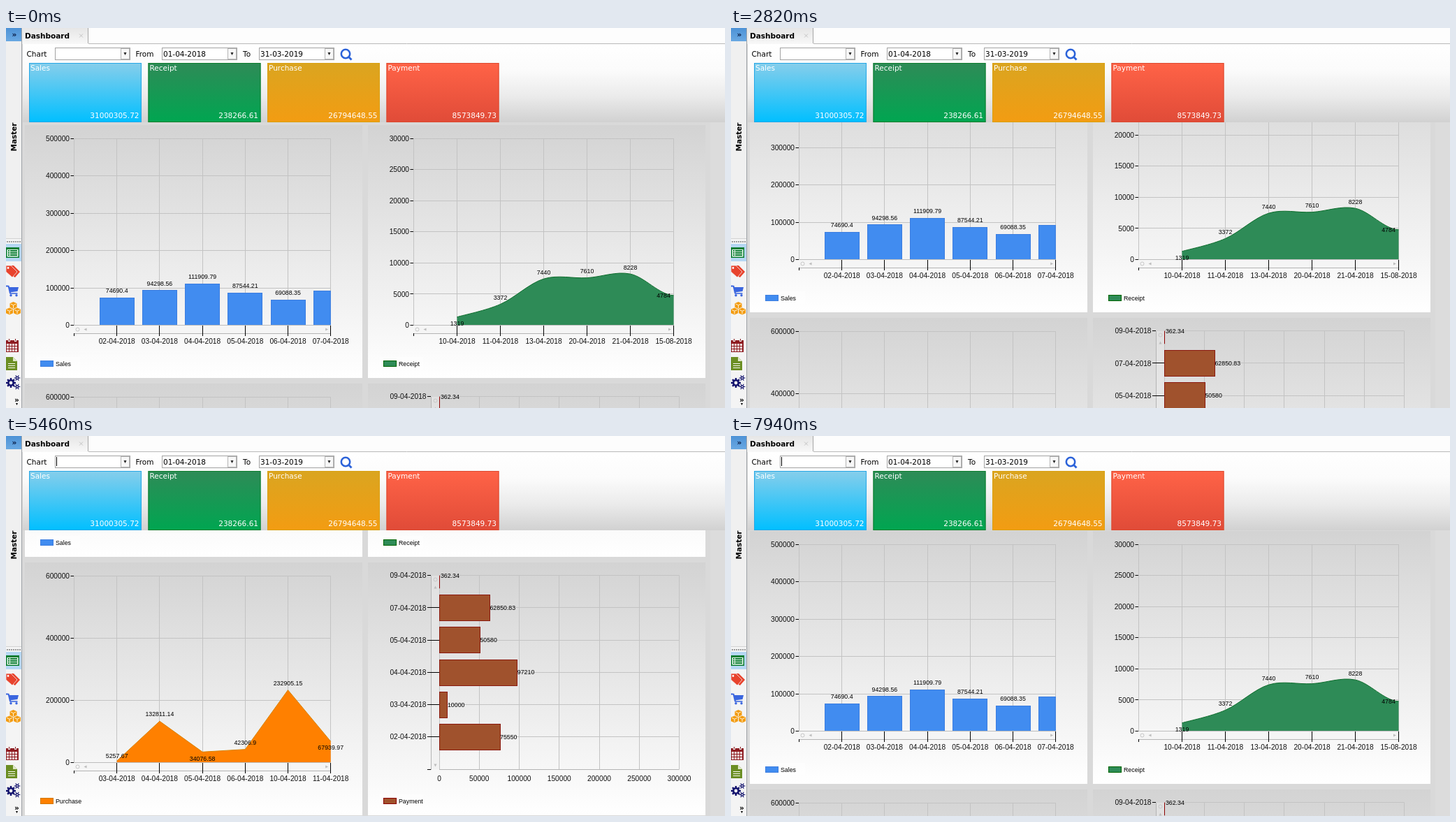
An HTML page with a canvas for the animation above (8 s loop, 1029 px wide and 544 px high).

```html
<!DOCTYPE html>
<html lang="en">
<head>
<meta charset="utf-8">
<title>Dashboard</title>
<style>
html, body { margin: 0; width: 100%; height: 100%; overflow: hidden; background: #ddd; }
canvas { display: block; width: 1029px; height: 544px; }
</style>
</head>
<body>
<canvas id="stage" width="1029" height="544"></canvas>
<script>
const ctx = document.getElementById('stage').getContext('2d');
const LOOP = 8000;
const UI = '"DejaVu Sans", Verdana, sans-serif';
const PLOT = '"Liberation Sans", Arial, sans-serif';
const GRID = '#c3c3c3';

// ---------- timing ----------
// Bursts of repaints: start, end, number of repaints
const bursts = [
  [1280, 1820, 8], [1970, 2740, 11], [2820, 3600, 11], [3670, 4450, 11], [4530, 4990, 7],
  [5460, 5460, 1], [5700, 6500, 11], [6550, 7320, 11], [7410, 7940, 8]
];
// Scroll path: time, offset, speed
const path = [
  [0, 0, 0], [1200, 0, 0.03], [2050, 32, 0.06], [3520, 170, 0.115], [4450, 283, 0.115],
  [4990, 328, 0.04], [5000, 328, 0], [5623, 328, -0.12], [6500, 204, -0.15], [7940, 3, -0.11]
];

function lastRepaint(t) {
  let tick = 0;
  for (const [start, end, count] of bursts) {
    if (t < start) break;
    const gap = count > 1 ? (end - start) / (count - 1) : 1;
    tick = start + Math.min(count - 1, Math.floor((t - start) / gap + 1e-6)) * gap;
  }
  return tick;
}

function scrollAt(t) {
  if (t >= 4990 && t < 5623) return 328;
  let i = 0;
  while (i < path.length - 2 && t >= path[i + 1][0]) i++;
  const [t0, y0, v0] = path[i], [t1, y1, v1] = path[i + 1];
  const d = t1 - t0, u = Math.min(1, (t - t0) / d), w = 1 - u;
  return Math.round(w * w * (1 + 2 * u) * y0 + u * u * (3 - 2 * u) * y1 +
    d * u * w * (w * v0 - u * v1));
}

const caretOn = t => t >= 1280 && Math.floor((t - 5460) / 530) % 2 === 0;

// ---------- drawing helpers ----------
function box(x, y, w, h, fill, stroke) {
  if (fill) { ctx.fillStyle = fill; ctx.fillRect(x, y, w, h); }
  if (stroke) {
    ctx.strokeStyle = stroke; ctx.lineWidth = 1;
    ctx.strokeRect(x + 0.5, y + 0.5, w - 1, h - 1);
  }
}

function vGrad(y0, y1, ...colors) {
  const g = ctx.createLinearGradient(0, y0, 0, y1);
  colors.forEach((c, i) => g.addColorStop(i / (colors.length - 1), c));
  return g;
}

function line(x0, y0, x1, y1, color = '#000', width = 1) {
  ctx.strokeStyle = color; ctx.lineWidth = width;
  ctx.beginPath(); ctx.moveTo(x0, y0); ctx.lineTo(x1, y1); ctx.stroke();
}

const snap = v => Math.floor(v) + 0.5;
const hLine = (x0, x1, y, color) => line(x0, snap(y), x1, snap(y), color);
const vLine = (x, y0, y1, color) => line(snap(x), y0, snap(x), y1, color);

function poly(points, fill, stroke, width = 1) {
  ctx.beginPath();
  points.forEach(([x, y], i) => i ? ctx.lineTo(x, y) : ctx.moveTo(x, y));
  ctx.closePath();
  if (fill) { ctx.fillStyle = fill; ctx.fill(); }
  if (stroke) { ctx.strokeStyle = stroke; ctx.lineWidth = width; ctx.stroke(); }
}

function disc(x, y, r, fill, stroke, width = 1) {
  ctx.beginPath(); ctx.arc(x, y, r, 0, 7);
  if (fill) { ctx.fillStyle = fill; ctx.fill(); }
  if (stroke) { ctx.strokeStyle = stroke; ctx.lineWidth = width; ctx.stroke(); }
}

// y is the middle of the capitals
function text(s, x, y, size, family, align = 'left', color = '#000', weight = '') {
  ctx.font = `${weight} ${size}px ${family}`;
  ctx.textAlign = align; ctx.fillStyle = color;
  ctx.fillText(s, x, Math.round(y + size * 0.36));
}
const label = (s, x, y, align = 'left', color = '#000', weight = '') =>
  text(s, x, y, 10.5, UI, align, color, weight);
const axisText = (s, x, y, align) => text(s, x, y, 10.2, PLOT, align, '#111');
const valueText = (s, x, y, align = 'center') => text(s, x, y, 8.8, PLOT, align);

function arrow(x, y, dx, dy, color, r = 2) {
  poly([[x + dx * r, y + dy * r], [x - dx * r + dy * r, y - dy * r + dx * r],
    [x - dx * r - dy * r, y - dy * r - dx * r]], color);
}

// ---------- charts ----------
function panel(x, name, color, edge) {
  box(x, 139, 483, 362, vGrad(139, 501, '#d3d3d3', '#ffffff'));
  box(x + 17, 471, 62, 18, 'rgba(255,255,255,.6)');
  box(x + 22, 476, 19, 9, color, edge);
  valueText(name, x + 44, 480.5, 'left');
}

// Grid with a value axis on the left and dates along the bottom
function frame(left, step, max, tick, dates) {
  const right = left + step * 6;
  for (let v = 0; v <= max; v += tick) {
    const y = 425.5 - 267.5 * v / max;
    hLine(left, right, y, GRID);
    hLine(left - 5, left, y);
    axisText(String(v), left - 6.5, y, 'right');
  }
  vLine(left, 158, 426, GRID);
  dates.forEach((d, i) => vLine(left + step * (i + 1), 158, 426, GRID));
  return right;
}

function dateAxis(left, step, dates) {
  const right = left + step * 6;
  box(left, 426, right - left, 11, 'rgba(246,246,246,.9)');
  hLine(left, right, 425, '#bdbdbd');
  hLine(left, right, 437, '#b4b4b4');
  disc(left + 5, 431.5, 2.5, null, '#c6c6c6');
  arrow(left + 16, 431.5, -1, 0, '#bcbcbc');
  arrow(right - 5.5, 431.5, 1, 0, '#bcbcbc');
  vLine(left, 437, 441);
  dates.forEach((d, i) => {
    const x = left + step * (i + 1);
    vLine(x, 426, 441);
    axisText(d + '-2018', x, 448, 'center');
  });
}

function salesChart() {
  const left = 97.5, step = 61.2;
  const dates = ['02-04', '03-04', '04-04', '05-04', '06-04', '07-04'];
  const sales = [74690.4, 94298.56, 111909.79, 87544.21, 69088.35, 92500];
  panel(27, 'Sales', '#418cf0', '#3f7fe0');
  const right = frame(left, step, 500000, 100000, dates);
  sales.forEach((v, i) => {
    const x = Math.round(left + step * (i + 1) - 25), y = Math.round(425.5 - v * 267.5 / 500000);
    box(x, y, Math.min(50, right - x), 426 - y, '#418cf0', '#3b7de0');
  });
  dateAxis(left, step, dates);
  sales.slice(0, 5).forEach((v, i) =>
    valueText(String(v), left + step * (i + 1), 416 - v * 267.5 / 500000));
}

function receiptChart() {
  const left = 583.5, step = 62;
  const dates = ['10-04', '11-04', '13-04', '20-04', '21-04', '15-08'];
  const values = [1319, 3372, 7440, 7610, 8228, 4784];
  panel(518, 'Receipt', '#2e8b57', '#006400');
  frame(left, step, 30000, 5000, dates);
  const pts = [...values, 7700].map((v, i) => [left + step * (i + 1), 425.5 - v * 267.5 / 30000]);
  const curve = () => {
    for (let i = 0; i < 5; i++) {
      const a = pts[Math.max(0, i - 1)], b = pts[i], c = pts[i + 1], d = pts[i + 2];
      ctx.bezierCurveTo(b[0] + (c[0] - a[0]) / 6, b[1] + (c[1] - a[1]) / 6,
        c[0] - (d[0] - b[0]) / 6, c[1] - (d[1] - b[1]) / 6, c[0], c[1]);
    }
  };
  ctx.beginPath(); ctx.moveTo(pts[0][0], 426); ctx.lineTo(...pts[0]);
  curve();
  ctx.lineTo(pts[5][0], 426); ctx.fillStyle = '#2e8b57'; ctx.fill();
  ctx.beginPath(); ctx.moveTo(...pts[0]); curve();
  ctx.strokeStyle = '#0b6b2a'; ctx.lineWidth = 1; ctx.stroke();
  dateAxis(left, step, dates);
  const shift = [[0, 9.5], [0, -9.5], [0, -9.5], [0, -9.5], [0, -9.5], [-14.5, 0]];
  values.forEach((v, i) => valueText(String(v), pts[i][0] + shift[i][0], pts[i][1] + shift[i][1]));
}

function purchaseChart() {
  const left = 97.5, step = 61.2;
  const dates = ['03-04', '04-04', '05-04', '06-04', '10-04', '11-04'];
  const values = [5257.67, 132811.14, 34076.58, 42306.9, 232905.15, 67939.97];
  panel(27, 'Purchase', '#ff8000', '#d07800');
  const right = frame(left, step, 600000, 200000, dates);
  const pts = values.map((v, i) => [left + step * (i + 1), 425.5 - v * 267.5 / 600000]);
  poly([[pts[0][0], 426], ...pts, [right, 426]], '#ff8000');
  pts.slice(1).forEach((p, i) => line(...pts[i], ...p, '#d88200'));
  dateAxis(left, step, dates);
  const shift = [-7, -10, 9.5, -9.5, -9.5, 9];
  values.forEach((v, i) => valueText(String(v), pts[i][0], pts[i][1] + shift[i]));
}

function paymentChart() {
  const left = 620, stepX = 57.25, stepY = 46.2, top = 157.7, bottom = 435;
  const rows = [['09-04', 362.34], ['07-04', 62850.83], ['05-04', 50580],
    ['04-04', 97210], ['03-04', 10000], ['02-04', 75550]];
  panel(518, 'Payment', '#a0522d', '#8b0000');
  for (let i = 0; i <= 6; i++) {
    const x = left + stepX * i;
    vLine(x, top, bottom, GRID);
    axisText(String(i * 50000), x, 448, 'center');
  }
  rows.forEach((r, i) => hLine(left, left + stepX * 6, top + stepY * i, GRID));
  box(609, 158, 11, 277, 'rgba(238,238,238,.45)');
  vLine(608, 158, 436, '#b4b4b4');
  disc(614.5, 163.5, 2.5, null, '#c8c8c8');
  arrow(614.5, 174.5, 0, -1, '#bcbcbc');
  arrow(614.5, 429.5, 0, 1, '#bcbcbc');
  hLine(left, left + stepX * 6, bottom, '#b4b4b4');
  hLine(603, 608, bottom);
  rows.forEach(([day, v], i) => {
    const y = top + stepY * i, w = v * stepX / 50000;
    hLine(603, i ? left : 608, y);
    axisText(day + '-2018', 601.5, y, 'right');
    if (i) box(left, Math.round(y - 18.7), Math.round(w) + 1, 38, '#a0522d', '#8b1a10');
    else vLine(left, y, y + 18.5, '#8b0000');
    valueText(String(v), left + w + (i ? 0.5 : 1.5), y, 'left');
  });
}

function charts(scroll) {
  ctx.save();
  ctx.beginPath(); ctx.rect(24, 135, 1005, 409); ctx.clip();
  box(24, 135, 1005, 409, '#dcdcdc');
  box(24, 135, 984, 409, '#d9d9d9');
  ctx.translate(0, -scroll);
  salesChart();
  receiptChart();
  ctx.translate(0, 370);
  purchaseChart();
  paymentChart();
  ctx.restore();
}

// ---------- header ----------
function combo(x, value) {
  box(x, 28, 108, 18, '#fff', '#a3a3a3');
  box(x + 94, 29, 13, 16, '#f7f7f7', '#b5b5b5');
  arrow(x + 100.5, 37, 0, 1, '#222');
  label(value, x + 2, 37);
}

function tile(x, name, amount, from, to, edge) {
  box(x, 50, 161, 85, vGrad(50, 135, from, to), edge);
  label(name, x + 2, 57, 'left', '#fff');
  label(amount, x + 157.5, 125, 'right', '#fff');
}

function header(caret) {
  box(24, 0, 1005, 23, '#fdfdfd');
  hLine(118, 1029, 22, '#b8b8b8');
  box(24, 23, 1005, 112, vGrad(23, 135, '#ffffff', '#fbfbfb', '#ebebeb', '#d1d1d1'));
  box(23, 0, 95, 23, vGrad(0, 23, '#e6e6e6', '#f8f8f8'));
  vLine(117, 0, 22, '#a6a6a6');
  label('Dashboard', 27, 11, 'left', '#000', 'bold');
  line(105, 8.5, 110, 13.5, '#c4c4c4');
  line(110, 8.5, 105, 13.5, '#c4c4c4');

  label('Chart', 29.5, 37.5);
  combo(70, '');
  label('From', 185.5, 37.5);
  combo(223, '01-04-2018');
  label('To', 339, 37.5);
  combo(362, '31-03-2019');
  if (caret) box(72, 30, 1, 13, '#000');
  disc(486, 37, 6.2, '#fff', '#2b62d9', 2.6);
  line(490.5, 41.5, 494.5, 45.5, '#2b62d9', 2.8);

  tile(33, 'Sales', '31000305.72', '#87ceeb', '#00bfff', '#25a7e6');
  tile(203.5, 'Receipt', '238266.61', '#2e8b57', '#00a651', '#0c7d2c');
  tile(374, 'Purchase', '26794648.55', '#daa520', '#f39c12', '#d9a010');
  tile(544.5, 'Payment', '8573849.73', '#ff6347', '#e04b38', '#dc4a30');
}

// ---------- sidebar ----------
function gear(x, y, r, teeth) {
  for (let i = 0; i < teeth; i++) {
    const a = i * 2 * Math.PI / teeth;
    line(x, y, x + Math.cos(a) * (r + 2), y + Math.sin(a) * (r + 2), '#14146e', r * 0.5);
  }
  disc(x, y, r, '#14146e');
  disc(x, y, r * 0.48, '#f0f0f0');
}

function cube(x, y) {
  const c = '#f39c12', w = '#fff3d8';
  poly([[x, y - 5], [x + 5, y - 2.7], [x + 5, y + 2.7], [x, y + 5], [x - 5, y + 2.7], [x - 5, y - 2.7]], c);
  line(x - 3.8, y - 2, x, y - 0.2, w);
  line(x + 3.8, y - 2, x, y - 0.2, w);
  line(x, y, x, y + 4, w);
}

function icons() {
  box(0, 314, 19, 15, '#0b7d33');
  box(1.5, 317, 16, 10.5, '#e9f7ec');
  for (let y = 318; y < 327; y += 3) {
    box(3, y, 2, 2, '#0b7d33');
    box(6, y, 10, 2, '#0b7d33');
  }

  poly([[5, 340], [11, 340], [20, 349], [13, 357], [11, 356]], '#e8432d');
  poly([[0, 340], [7, 340], [16, 349], [9, 357], [0, 349]], '#e8432d', '#f0f0f0', 0.8);
  disc(3, 343.5, 1.4, '#fff');

  line(0, 369.5, 3.5, 369.5, '#3b66df', 2);
  line(3.5, 369, 6, 380, '#3b66df', 2);
  poly([[4, 371], [18, 371], [16.5, 377], [5.5, 378.5]], '#3b66df');
  line(5.5, 380, 16.5, 380, '#3b66df', 1.6);
  disc(7, 382.7, 1.7, '#3b66df');
  disc(15, 382.7, 1.7, '#3b66df');

  cube(10.5, 397); cube(5, 405.5); cube(16, 405.5);

  box(0, 447, 18, 17, '#8f1d22');
  for (let y = 452; y < 463; y += 4)
    for (let x = 1; x < 17; x += 4) box(x, y, 3, 3, '#f4eaea');
  box(3, 444, 3, 5, '#8f1d22', '#f0f0f0');
  box(12, 444, 3, 5, '#8f1d22', '#f0f0f0');

  poly([[0, 471], [10, 471], [16, 477], [16, 490], [0, 490]], '#6b8e23');
  poly([[10, 471], [10, 477], [16, 477]], '#dfe8c8');
  for (let y = 480; y < 488; y += 3) box(3, y, 10, 1, '#f4f7ea');

  gear(7, 508, 5, 8);
  gear(16, 501, 2.3, 6);
  gear(16, 513.5, 2.3, 6);
}

function sidebar() {
  box(0, 0, 24, 544, '#f0f0f0');
  box(0, 0, 22, 19, vGrad(0, 19, '#4d92d6', '#69a8e2'));
  label('»', 12, 9.5, 'center', '#0a1c44', 'bold');
  box(0, 302, 22, 242, '#f4f4f4');
  hLine(0, 22, 301, '#d2d2d2');
  for (let x = 1; x < 21; x += 3) box(x, 305, 2, 2, '#9c9c9c');
  box(0, 309, 22, 25, '#b5d7f3');
  box(22, 0, 1, 544, '#9fa3a8');
  box(23, 23, 1, 521, '#d6d6d6');
  ctx.save();
  ctx.translate(11, 156);
  ctx.rotate(-Math.PI / 2);
  label('Master', 0, 0, 'center', '#000', 'bold');
  ctx.restore();
  icons();
  label('»', 15.5, 532, 'center', '#000', 'bold');
  arrow(15.5, 538.5, 0, 1, '#000', 1.5);
}

function draw(now) {
  const tick = lastRepaint(now % LOOP);
  ctx.clearRect(0, 0, 1029, 544);
  charts(scrollAt(tick));
  header(caretOn(tick));
  sidebar();
}

const began = performance.now();
function loop() {
  draw(performance.now() - began);
  requestAnimationFrame(loop);
}
loop();
</script>
</body>
</html>
```
